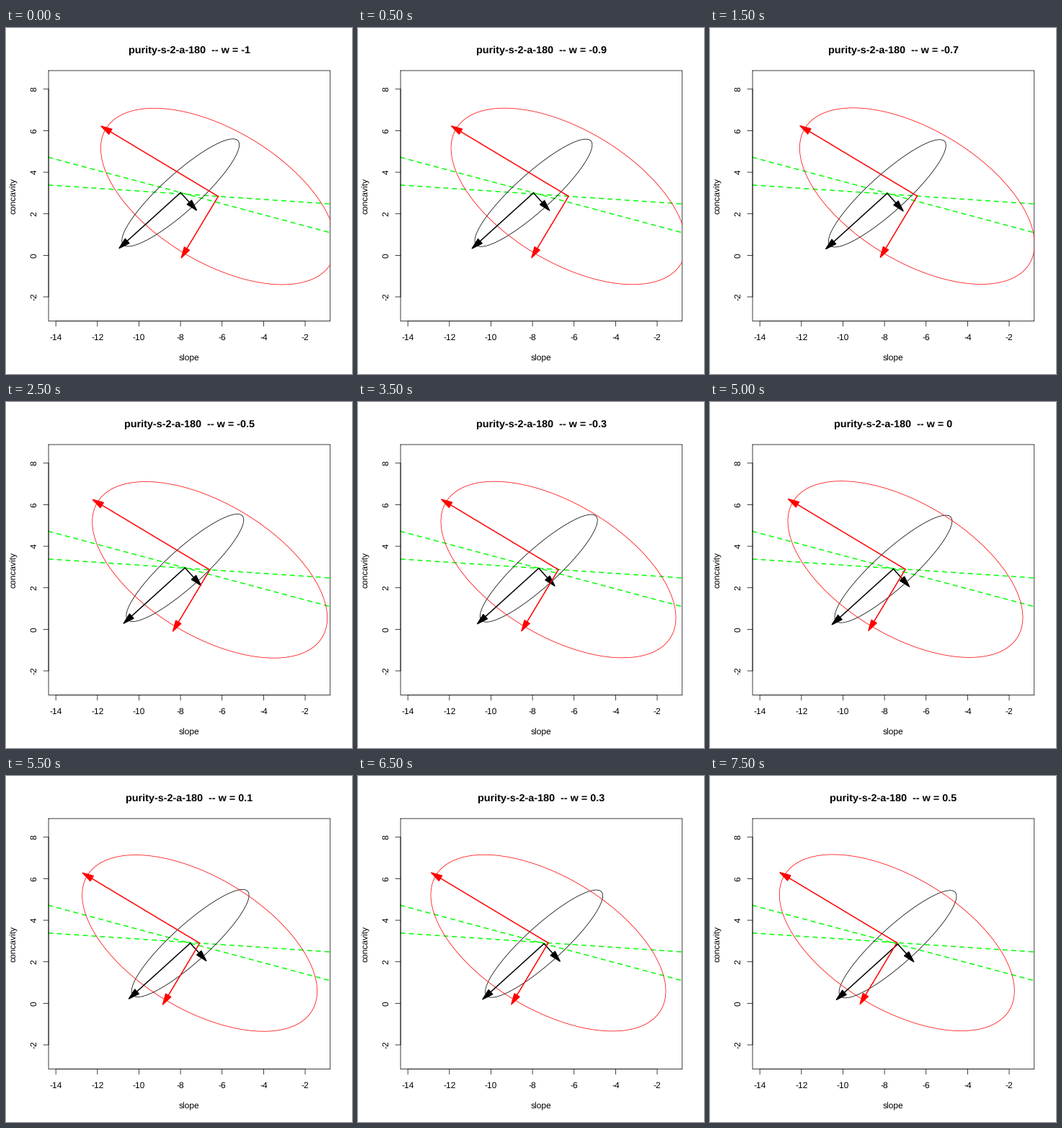
Write a matplotlib script that moves like this. It is 480 by 480 pixels and loops after 8 s.

```python
import numpy as np
import matplotlib.pyplot as plt
from matplotlib.animation import FuncAnimation
from matplotlib.patches import Polygon, Rectangle

plt.rcParams.update({
    "font.family": "Liberation Sans",
    "text.hinting": "none",
    "text.kerning_factor": 6,
    "axes.unicode_minus": False,
})

SIZE, DPI = 480, 72
FRAMES, STEP_MS = 16, 500
LEFT, RIGHT, TOP, BOTTOM = 59.04, 449.76, 59.04, 406.56
MID_X, MID_Y = (LEFT + RIGHT) / 2, (TOP + BOTTOM) / 2
UNIT = 28.82  # pixels per data unit
TICK = 7.2
THIN, THICK = 0.75, 1.5

fig = plt.figure(figsize=(SIZE / DPI, SIZE / DPI), dpi=DPI, facecolor="white")
ax = fig.add_axes([0, 0, 1, 1])
ax.set_xlim(0, SIZE)
ax.set_ylim(SIZE, 0)
ax.axis("off")

clip = Rectangle((LEFT, TOP), RIGHT - LEFT, BOTTOM - TOP, transform=ax.transData)


def steep(x):
    return 179.4 + 0.2674 * (x - LEFT)


def shallow(x):
    return 217.85 + 0.067 * (x - LEFT)


def label(x, y, text, size=12, **kw):
    return ax.text(x, y, text, size=size, ha="center", va="baseline",
                   rotation_mode="anchor", **kw)


def rule(xs, ys):
    ax.plot(xs, ys, color="black", lw=THIN, snap=False,
            solid_capstyle="round", zorder=2)


THETA = np.linspace(0, 2 * np.pi, 400)
# arrowhead pointing along +x, centred on the origin
HEAD = np.array([[7.4, 0], [-7.4, 4.1], [-7.4, -4.1]])


class Arrow:
    def __init__(self, vec, color):
        self.vec = np.array(vec)
        c, s = self.vec / np.hypot(*vec)
        self.outline = HEAD @ np.array([[c, s], [-s, c]])
        self.shaft, = ax.plot([], [], color=color, lw=THICK, zorder=3)
        self.head = ax.add_patch(Polygon(self.outline, closed=True, color=color,
                                         lw=THICK, joinstyle="round", zorder=3))

    def move(self, start):
        end = start + self.vec
        self.shaft.set_data([start[0], end[0]], [start[1], end[1]])
        self.head.set_xy(self.outline + end)


class Ellipse:
    """Outline plus an arrow along each semi-axis; the centre slides on a line."""

    def __init__(self, color, major, minor, x0, speed, path):
        self.x0, self.speed, self.path = x0, speed, path
        self.rim = (np.outer(np.cos(THETA), major)
                    + np.outer(np.sin(THETA), minor))
        self.curve, = ax.plot([], [], color=color, lw=THIN, zorder=2)
        self.curve.set_clip_path(clip)
        self.arrows = [Arrow(major, color), Arrow(minor, color)]

    def move(self, w):
        x = self.x0 + self.speed * w
        centre = np.array([x, self.path(x)])
        self.curve.set_data(*(self.rim + centre).T)
        for arrow in self.arrows:
            arrow.move(centre)


def semi_axes(major, minor, angle):
    """Perpendicular semi-axis vectors of the given lengths."""
    c, s = np.cos(angle), np.sin(angle)
    return major * np.array([c, s]), minor * np.array([s, -c])


# box, axis lines, ticks and labels
rule([LEFT, RIGHT, RIGHT, LEFT, LEFT], [TOP, TOP, BOTTOM, BOTTOM, TOP])
x_ticks = {v: 415 + UNIT * (v + 2) for v in range(-14, -1, 2)}
y_ticks = {v: 373 - UNIT * (v + 2) for v in range(-2, 9, 2)}
rule([x_ticks[-14], x_ticks[-2]], [BOTTOM, BOTTOM])
rule([LEFT, LEFT], [y_ticks[-2], y_ticks[8]])
for v, x in x_ticks.items():
    rule([x, x], [BOTTOM, BOTTOM + TICK])
    label(x, 432.9, str(v))
for v, y in y_ticks.items():
    rule([LEFT - TICK, LEFT], [y, y])
    label(42.4, y, str(v), rotation=90)
label(MID_X, 461.7, "slope")
label(13.6, MID_Y, "concavity", rotation=90)
title = label(MID_X, 34.9, "", size=14.4, weight="bold")

ends = np.array([LEFT, RIGHT])
for line in (steep, shallow):
    ax.plot(ends, line(ends), color="#00ff00", lw=THICK, ls=(0, (4, 4)),
            dash_capstyle="round", zorder=1.5, clip_path=clip)

ellipses = [
    Ellipse("black", *semi_axes(107.4, 25.6, np.arctan2(0.671, -0.741)),
            254.4, 12.2, steep),
    Ellipse("red", *semi_axes(181.9, 91.9, np.arctan2(-0.5145, -0.8575)),
            271.0, -23.4, shallow),
]


def draw(i):
    w = (i - 10) / 10
    title.set_text(f"purity-s-2-a-180  -- w = {w:g}")
    for e in ellipses:
        e.move(w)


anim = FuncAnimation(fig, draw, frames=FRAMES, interval=STEP_MS,
                     repeat=True, repeat_delay=0)
plt.show()
```
